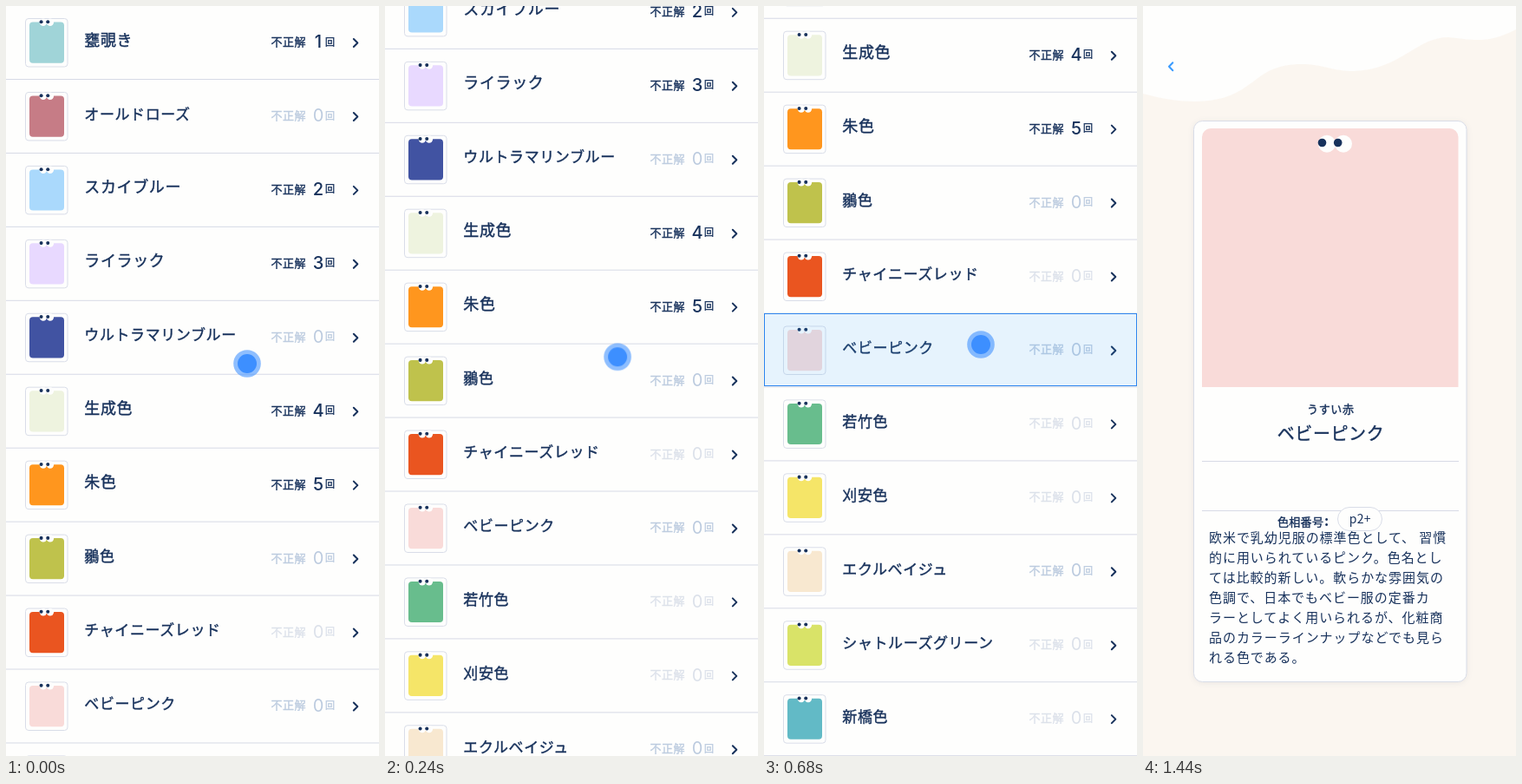
These frames come from a looping animation (430 by 864 pixels, 1960 ms). An HTML page:

```html
<!DOCTYPE html>
<html lang="ja">
<head>
<meta charset="utf-8">
<title>色の一覧</title>
<style>
  html, body { margin: 0; width: 100%; height: 100%; overflow: hidden; background: #fefefd; }
  svg { display: block; width: 430px; height: 864px; color: #18325c; }
  text { font-family: "Noto Sans CJK JP", "Noto Sans CJK", sans-serif; fill: currentColor; }
  /* a hairline outline stands in for the medium weight */
  .medium { stroke: currentColor; stroke-width: .4px; }
  .name { letter-spacing: .035em; }
  .label { font-size: 13px; letter-spacing: .5px; }
  .count { font-family: Inter, sans-serif; font-size: 20px; text-anchor: middle; }
  .unit { font-size: 11px; }
  .hit .count { font-weight: 500; }
  .miss { color: #bccbdf; }
  .faint { color: #dce1ea; }
  .name { color: #18325c; }
  .chevron { fill: none; stroke: #18325c; stroke-width: 2; stroke-linecap: round; stroke-linejoin: round; }
  .paper { fill: #fefefd; }
  .outline { fill: #fefefd; stroke: #d9dde8; }
  .rule { fill: #d7dae6; }
  .centered { text-anchor: middle; }
  .body text { font-size: 15px; letter-spacing: .95px; }
  #card { filter: drop-shadow(0 1px 3px #18325c14); }
</style>
</head>
<body>
<svg viewBox="0 0 430 864">
  <defs>
    <g id="eyes">
      <circle class="paper" cx="5.5" cy="1.2" r="10"/>
      <circle class="paper" cx="24.5" cy="1.2" r="10"/>
      <circle cx="0" cy="0" r="4.8" fill="#18325c"/>
      <circle cx="18.2" cy="0" r="4.8" fill="#18325c"/>
    </g>
  </defs>

  <g id="list"></g>

  <g id="press">
    <rect x=".5" y="354.5" width="429" height="83" fill="#3da0ff" fill-opacity=".12" stroke="#2f86ee"/>
  </g>
  <g id="pointer">
    <circle r="15.8" fill="#3d8fff" fill-opacity=".58"/>
    <circle r="11" fill="#3d8fff"/>
  </g>

  <g id="detail">
    <rect width="430" height="864" fill="#fbf6f0"/>
    <path class="paper" d="M0 101C22 107 42 110 60 110C132 109 122 67 183 67C207 67 218 75 243 75C298 73 315 36 352 36C382 39 397 44 430 27V0H0Z"/>
    <path class="chevron" style="stroke:#3a9bff" d="M34.3 65.2L30 69.7L34.3 74.2"/>
    <rect id="card" class="outline" x="58.5" y="132.5" width="314.5" height="646" rx="10"/>
    <path fill="#f9dbd9" d="M68 439V151a10 10 0 0 1 10-10H353.5a10 10 0 0 1 10 10V439Z"/>
    <use href="#eyes" x="206.5" y="157.5"/>
    <text class="centered medium" x="216.3" y="469" font-size="13" letter-spacing=".6">うすい赤</text>
    <text class="centered medium" x="216.5" y="499.5" font-size="20" letter-spacing=".6">ベビーピンク</text>
    <rect class="rule" x="68" y="524" width="296" height="1"/>
    <rect class="rule" x="68" y="581" width="296" height="1"/>
    <text class="medium" x="155" y="599" font-size="13" letter-spacing=".3">色相番号</text>
    <text x="209" y="599" font-size="16" font-weight="700">:</text>
    <rect class="outline" x="224.5" y="577.5" width="51" height="27" rx="13.5"/>
    <text class="centered" x="250.3" y="596" font-size="14" letter-spacing=".3">p2+</text>
    <g id="body" class="body"></g>
  </g>
</svg>
<script>
const LOOP = 1960, TICK = 40, ROW = 84.94;
const $ = id => document.getElementById(id);

// name, swatch colour, wrong answers, style of the counter
const colors = [
  ["甕覗き", "#a0d4d8", 1, "hit"],
  ["オールドローズ", "#c67c86", 0, "miss"],
  ["スカイブルー", "#aad9fc", 2, "hit"],
  ["ライラック", "#e8d9ff", 3, "hit"],
  ["ウルトラマリンブルー", "#4153a2", 0, "miss"],
  ["生成色", "#eef3df", 4, "hit"],
  ["朱色", "#ff961e", 5, "hit"],
  ["鶸色", "#bfc24c", 0, "miss"],
  ["チャイニーズレッド", "#ea5520", 0, "faint"],
  ["ベビーピンク", "#f9dbd9", 0, "miss"],
  ["若竹色", "#68bd8d", 0, "faint"],
  ["刈安色", "#f5e568", 0, "faint"],
  ["エクルベイジュ", "#f8e8d0", 0, "miss"],
  ["シャトルーズグリーン", "#d9e368", 0, "faint"],
  ["新橋色", "#62bac6", 0, "faint"],
];

const lines = [
  "欧米で乳幼児服の標準色として、 習慣",
  "的に用いられているピンク。色名とし",
  "ては比較的新しい。軟らかな雰囲気の",
  "色調で、日本でもベビー服の定番カ",
  "ラーとしてよく用いられるが、化粧商",
  "品のカラーラインナップなどでも見ら",
  "れる色である。",
];

const row = ([name, color, count, style], i) => `
  <g class="${style}" transform="translate(0 ${i * ROW})">
    <rect class="outline" x="22.5" y="14.5" width="48.5" height="55.5" rx="3.5"/>
    <rect x="27" y="18.5" width="40" height="47.2" rx="4" fill="${color}"/>
    <use href="#eyes" transform="translate(40.6 18.3) scale(.42)"/>
    <text class="name medium" x="90.3" y="45.6" font-size="${count ? 18 : 17}">${name}</text>
    <text class="label medium" x="305.5" y="46">不正解</text>
    <text class="count" x="360" y="48.2">${count}</text>
    <text class="unit medium" x="368" y="45.6">回</text>
    <path class="chevron" d="M400.8 38L405.3 42.5L400.8 47"/>
    <rect class="rule" y="84" width="430" height="1"/>
  </g>`;

$("list").innerHTML = colors.map(row).join("");
$("body").innerHTML = lines.map((s, i) => `<text x="76" y="${617.7 + 23 * i}">${s}</text>`).join("");

// Linear change from a to b between two times, held before and after, one step per tick.
function tween(id, prop, a, b, from, to) {
  $(id).animate([
    { [prop]: a, offset: 0 },
    { [prop]: a, offset: from / LOOP, easing: `steps(${(to - from) / TICK})` },
    { [prop]: b, offset: to / LOOP },
    { [prop]: b, offset: 1 },
  ], { duration: LOOP, iterations: Infinity, delay: -1 });
}

tween("list", "transform", "translate(0px, 0px)", "translate(0px, -410px)", 0, 480);
tween("pointer", "transform", "translate(278px, 412px)", "translate(250px, 390px)", 0, 680);
tween("press", "opacity", 0, 1, 560, 640);
tween("detail", "opacity", 0, 1, 960, 1440);
</script>
</body>
</html>
```
